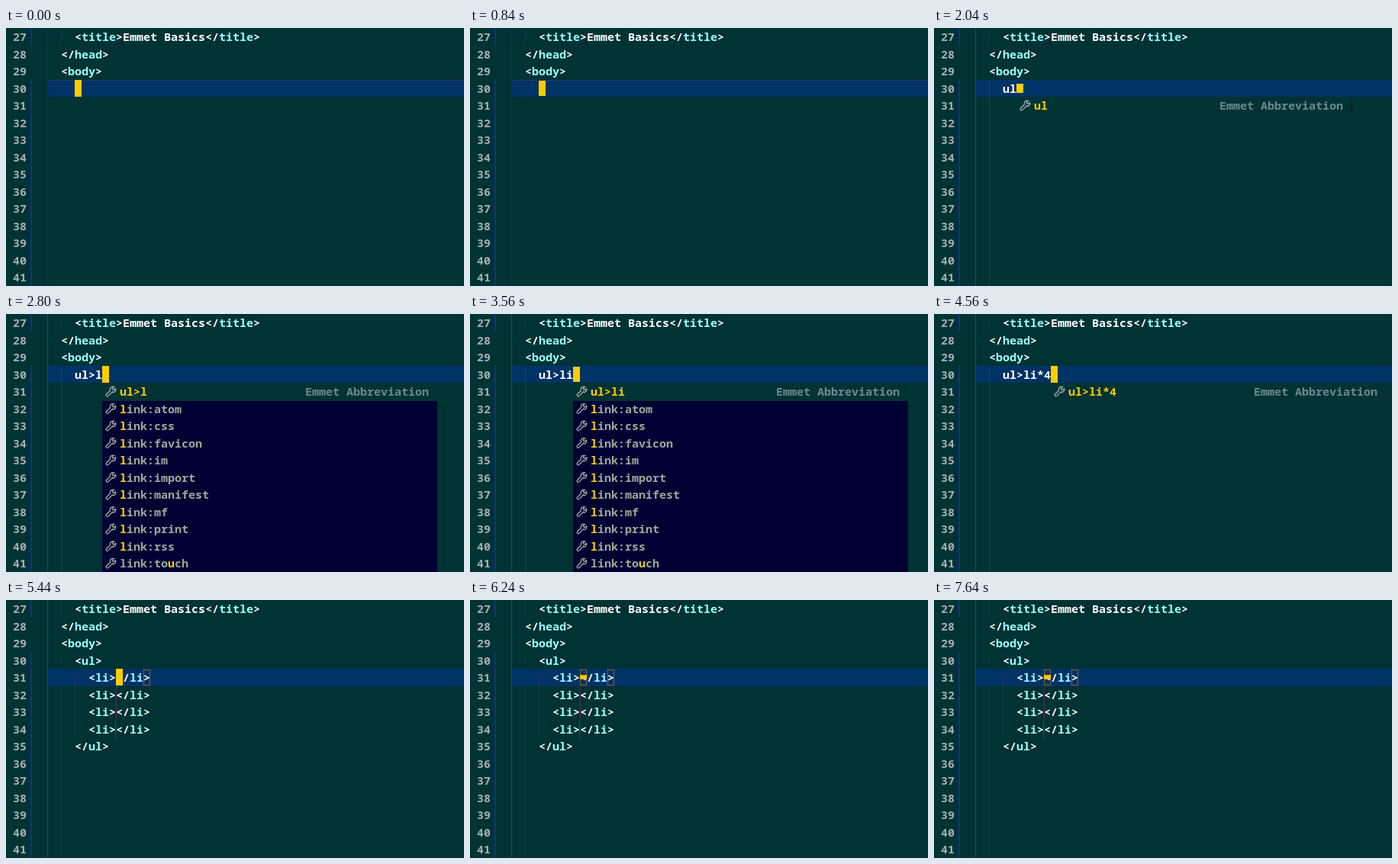
Write an HTML page with a canvas that moves like this. It is 600 by 338 pixels and loops after 7680 ms.

```html
<!DOCTYPE html>
<html lang="en">
<head>
<meta charset="utf-8">
<title>Emmet Basics</title>
<style>
  html, body { margin: 0; width: 100%; height: 100%; overflow: hidden; background: #003333; }
  canvas { display: block; width: 600px; height: 338px; }
</style>
</head>
<body>
<canvas id="stage" width="600" height="338"></canvas>
<script>
const ctx = document.getElementById('stage').getContext('2d');
const LOOP = 7680, CHAR = 9, LEFT = 54, PITCH = 22.5, FIRST = 27;
const BLUE = '#00338c', PURPLE = '#403380', GUTTER = '#0f3385';

// Each step: start time, typed text, start of the cursor's blink cycle
const steps = [
  { at: 0, text: '', blink: 0 },
  { at: 1080, text: 'u', popup: true },
  { at: 1300, text: 'ul', popup: true },
  { at: 2640, text: 'ul>' },
  { at: 2760, text: 'ul>l', popup: true, list: true },
  { at: 2900, text: 'ul>li', popup: true, list: true },
  { at: 3960, text: 'ul>li*' },
  { at: 4240, text: 'ul>li*4', popup: true },
  { at: 5440, text: '', expanded: true }
];
const links = ['atom', 'css', 'favicon', 'im', 'import', 'manifest', 'mf', 'print', 'rss', 'touch'];

const colX = col => LEFT + col * CHAR;
const midY = line => 12 + (line - FIRST) * PITCH;
const topY = line => Math.round(midY(line) - 12);

function rect(x, y, w, h, color) {
  ctx.fillStyle = color;
  ctx.fillRect(x, y, w, h);
}

function text(str, x, line, color, weight = 600) {
  ctx.font = `${weight} 15px "Noto Sans Mono", "DejaVu Sans Mono", monospace`;
  ctx.fillStyle = color;
  ctx.fillText(str, x, Math.round(midY(line) + 5));
}

function code(str, col, line) {
  let x = colX(col), inTag = false;
  for (const token of str.match(/<\/?|>|[^<>]+/g)) {
    const bracket = /[<>]/.test(token);
    const isName = inTag && !bracket;
    text(token, x, line, isName ? '#99ffff' : '#ffffff', isName ? 600 : 700);
    if (bracket) inTag = token[0] === '<';
    x += token.length * CHAR;
  }
}

// Vertical line over whole rows, both ends included
function guide(x, from, to, color, width = 1) {
  rect(x, topY(from), width, topY(to + 1) - topY(from), color);
}

function wrench(x, y, color) {
  ctx.save();
  ctx.translate(x, y);
  ctx.rotate(-Math.PI / 4);
  ctx.strokeStyle = color;
  ctx.lineWidth = 1.4;
  ctx.beginPath();
  ctx.moveTo(1.5, -1.6);
  ctx.lineTo(-6, -1.6);
  ctx.arc(-6, 0, 1.6, -Math.PI / 2, Math.PI / 2, true);
  ctx.lineTo(1.5, 1.6);
  ctx.arc(4.3, 0, 3.7, 2.6, 0.5, true);
  ctx.lineTo(4.6, 1.3);
  ctx.lineTo(4.6, -1.3);
  ctx.lineTo(7.5, -1.8);
  ctx.arc(4.3, 0, 3.7, -0.5, -2.6, true);
  ctx.stroke();
  ctx.restore();
}

function cursorScale(ms) {
  if (ms < 0) return 1;
  const phase = ms % 1000;
  const half = phase < 500 ? phase : 1000 - phase;
  const p = Math.min(1, Math.max(0, (half - 100) / 300));
  return (1 + Math.cos(Math.PI * p)) / 2;
}

function cursor(x, line, scale) {
  const h = 22 * scale;
  rect(x, topY(line) + 11 - h / 2, CHAR, h, '#ffcc00');
}

function popup(step, x) {
  if (step.list) {
    const top = topY(32) + 1;
    rect(x, top, 439, 338 - top, '#000033');
    links.forEach((name, i) => {
      const line = 32 + i, label = 'link:' + name;
      const hit = name === 'touch' ? label.indexOf('u') : 0;
      const hitX = x + 23 + hit * CHAR;
      wrench(x + 11, midY(line), '#a0a89a');
      text(label.slice(0, hit), x + 23, line, '#99aa99');
      text(label[hit], hitX, line, '#ffcc00', 700);
      text(label.slice(hit + 1), hitX + CHAR, line, '#99aa99');
    });
  } else if (step.text === 'ul') {
    rect(x + 439, topY(31) + 2, 1, 19, '#001616');
  }
  wrench(x + 11, midY(31), '#a9a6b4');
  text(step.text, x + 23, 31, '#ffcc00', 700);
  text('Emmet Abbreviation', x + 266, 31, '#6f8894');
}

function outline(x, line) {
  ctx.strokeStyle = '#806633';
  ctx.lineWidth = 1;
  ctx.strokeRect(x + 0.5, topY(line) + 1.5, 8, 20);
}

function draw(t) {
  const step = steps.filter(s => s.at <= t).pop();
  const activeLine = step.expanded ? 31 : 30;
  const typing = step.text !== '';

  rect(0, 0, 600, 338, '#003333');
  guide(LEFT, activeLine, activeLine, '#003366', 546);
  if (!typing && !step.expanded) rect(LEFT, topY(30), 546, 1, '#2b3366');

  guide(32, 27, 27, GUTTER, 2);
  guide(32, 30, 42, GUTTER, 2);
  guide(LEFT, 27, 42, typing || step.expanded ? PURPLE : BLUE);
  guide(72, 27, 27, BLUE);
  if (typing) guide(72, 30, 42, '#1f4059');

  for (let n = 27; n <= 41; n++) text(n, 9, n, '#a6adb8');
  code('<title>Emmet Basics</title>', 4, 27);
  code('</head>', 2, 28);
  code('<body>', 2, 29);

  if (step.expanded) {
    guide(72, 30, 42, BLUE);
    guide(90, 31, 34, '#2e2a60');
    guide(144, 32, 33, '#4b3260');
    guide(143, 34, 34, '#803344');
    code('<ul>', 4, 30);
    for (let n = 31; n <= 34; n++) code('<li></li>', 6, n);
    code('</ul>', 4, 35);
    outline(144, 31);
    outline(180, 31);
  } else if (typing) {
    text(step.text, 90, 30, '#ffffff', 700);
  }

  const x = step.expanded ? 144 : colX(4 + step.text.length);
  if (step.popup) popup(step, x);
  cursor(x, activeLine, cursorScale(t - (step.blink ?? step.at + 500)));
}

const start = performance.now();
function frame() {
  draw((performance.now() - start) % LOOP);
  requestAnimationFrame(frame);
}
frame();
</script>
</body>
</html>
```
